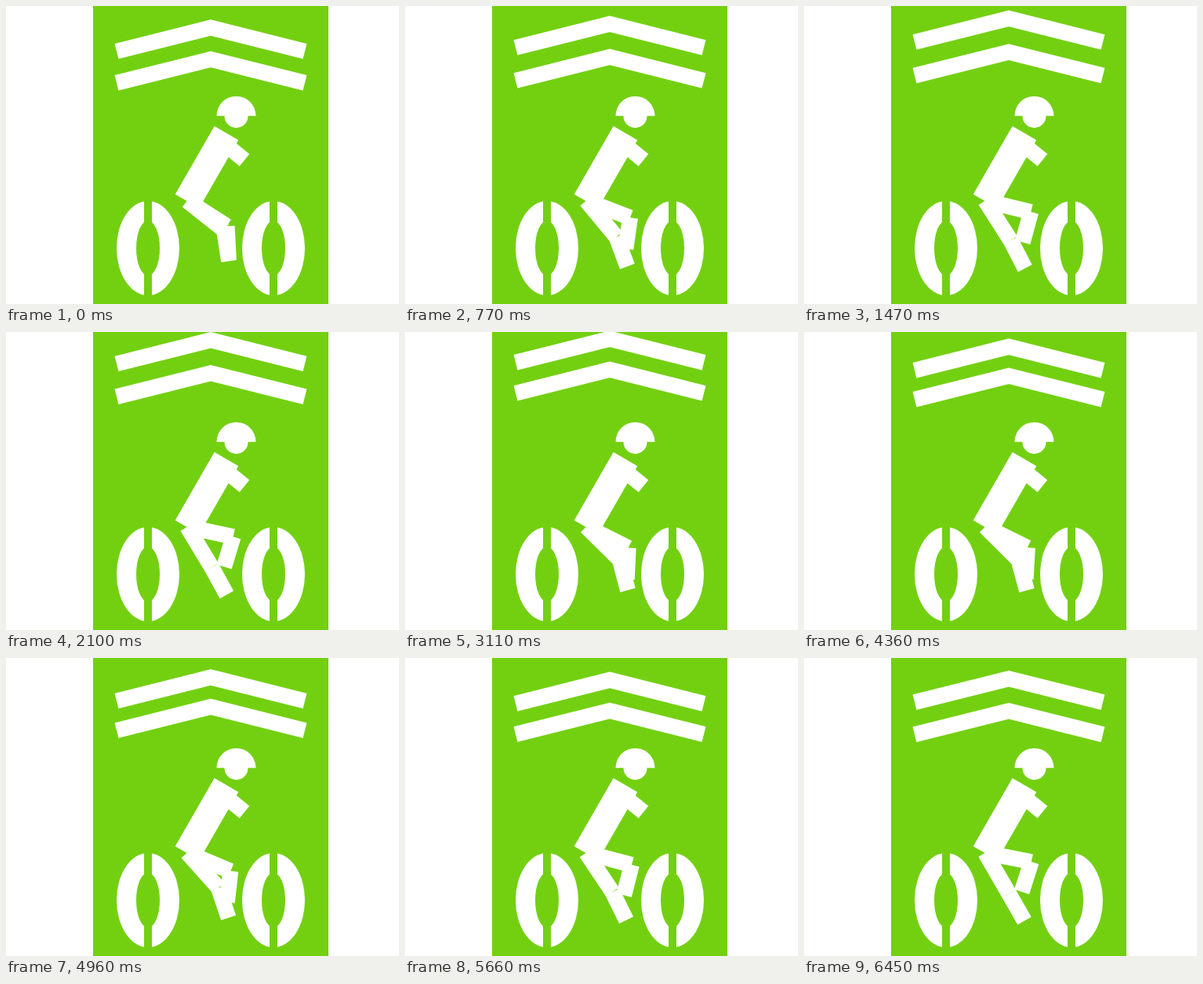
An HTML page with a canvas that plays this animation: 501x379 px, repeating every 6550 ms.

```html
<!DOCTYPE html>
<html lang="en">
<head>
<meta charset="utf-8">
<title>Cyclist</title>
<style>
  html, body { margin: 0; width: 100%; height: 100%; overflow: hidden; background: #fff; }
  canvas { display: block; }
</style>
</head>
<body>
<canvas id="stage" width="501" height="379"></canvas>
<script>
const ctx = document.getElementById('stage').getContext('2d');
const GREEN = '#73d011', WHITE = '#fff';
const LOOP = 6550;
const PEDAL = 0.3, DRIFT = PEDAL / 5; // radians per step
const RAD = Math.PI / 180;

// The step rate varies a little: [ms, step]
const PACE = [[0, 0], [2860, 49], [3110, 54], [5550, 96], [6450, 110]];

function stepAt(t) {
  const i = Math.max(1, PACE.findIndex(([ms]) => ms > t));
  const [[t0, s0], [t1, s1]] = t < 6450 ? [PACE[i - 1], PACE[i]] : PACE.slice(-2);
  const step = s0 + (s1 - s0) * (t - t0) / (t1 - t0);
  return Math.min(110, Math.floor(step + 0.3));
}

function bar(x, y, angle, left, top, w, h) {
  ctx.save();
  ctx.translate(x, y);
  ctx.rotate(angle * RAD);
  ctx.fillRect(left, top, w, h);
  ctx.restore();
}

function ellipse(x, y, rx, ry, color, from = 0, to = 2 * Math.PI) {
  ctx.fillStyle = color;
  ctx.beginPath();
  ctx.ellipse(x, y, rx, ry, 0, from, to);
  ctx.fill();
}

function chevron(y) {
  ctx.strokeStyle = WHITE;
  ctx.lineWidth = 20;
  ctx.beginPath();
  ctx.moveTo(141, y + 30);
  ctx.lineTo(261, y);
  ctx.lineTo(381, y + 30);
  ctx.stroke();
}

function wheel(x) {
  ellipse(x, 308, 40, 60, WHITE);
  ellipse(x, 308, 15, 35, GREEN);
  ctx.fillRect(x - 5, 246, 10, 124);
}

// Angles are measured from straight down, forward is positive
function leg(swing) {
  const thigh = 54.5 + 24.5 * swing, shin = 6 - 24 * swing;
  const x = 231, y = 247.7;
  bar(x, y, -thigh, -10, 0, 20, 60);
  bar(x + 60 * Math.sin(thigh * RAD), y + 60 * Math.cos(thigh * RAD), -shin, -10, 0, 20, 40);
}

function rider(swing) {
  ellipse(293.5, 139.7, 25, 25, WHITE, Math.PI, 2 * Math.PI);
  ellipse(293.5, 140, 15, 15, WHITE);
  bar(265.7, 152.8, 30, 0, 0, 35.3, 100);
  bar(304, 196, 39, -38, -10, 38, 20);
  leg(swing);
  leg(-swing);
}

function draw(step) {
  ctx.fillStyle = WHITE;
  ctx.fillRect(0, 0, 501, 379);
  ctx.fillStyle = GREEN;
  ctx.fillRect(111, 0, 300, 379);
  chevron(18 + 10 * Math.cos(step * DRIFT + 0.28));
  chevron(57.8 + 10 * Math.cos(step * DRIFT));
  wheel(181);
  wheel(341);
  rider(Math.sin(step * PEDAL - 0.12));
}

const begin = performance.now();
function tick() {
  draw(stepAt((performance.now() - begin) % LOOP));
  requestAnimationFrame(tick);
}
tick();
</script>
</body>
</html>
```
